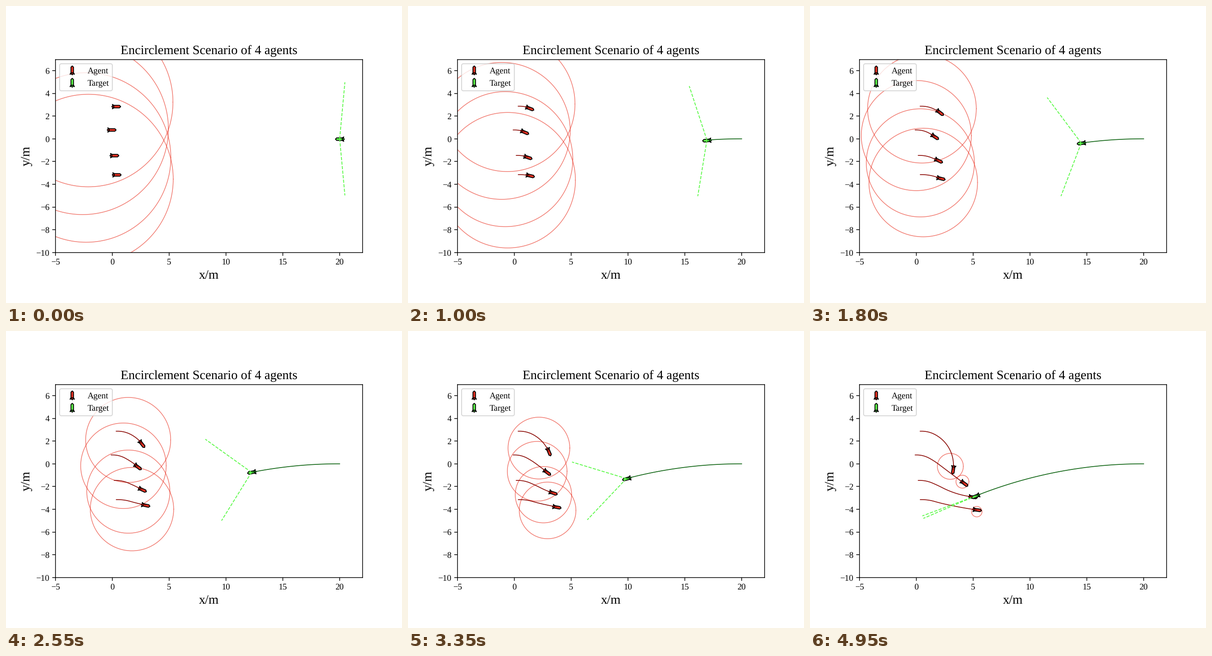
Recreate the animation shown at these times as a matplotlib script. Size 864 by 648 pixels, loop 5000 ms.

```python
import numpy as np
import matplotlib.pyplot as plt
from matplotlib.animation import FuncAnimation
from matplotlib.lines import Line2D
from matplotlib.markers import MarkerStyle
from matplotlib.path import Path
from matplotlib.transforms import Affine2D

FRAMES, STEP = 100, 0.05
RED, GREEN = "#ea3323", "#5ff94c"
DARK_RED, DARK_GREEN = "#8b0a05", "#0d6311"
SPEED = 3.06           # target speed in m/s
RATIO = 1 / 3          # agent speed / target speed
REACH = 5              # length of the sight lines

plt.rcParams["font.family"] = "Liberation Serif"
plt.rcParams["text.hinting"] = "no_hinting"

# Start point of each agent and its heading (degrees) at the turn times.
TURN_TIMES = [0.1, 1.2, 2.2, 5]
AGENTS = [
    ((0.34, 2.87), (0, -26, -45, -99)),
    ((-0.10, 0.78), (0, -28, -37, -37)),
    ((0.17, -1.46), (0, -23, -27, -6)),
    ((0.35, -3.15), (0, -16, -12.5, -8)),
]


def direction(angle):
    return np.stack([np.cos(angle), np.sin(angle)], axis=-1)


def travel(start, heading, speed):
    """Positions after moving one step at a time along the heading."""
    steps = speed * STEP * direction(heading[:-1])
    return np.vstack([start, start + np.cumsum(steps, axis=0)])


times = np.arange(FRAMES) * STEP
target_heading = np.radians(180 + 4.42 * times)
target = travel((20, 0), target_heading, SPEED)
half_angle = np.radians(95.3 - 18.98 * times)

headings = [np.radians(np.interp(times, TURN_TIMES, turns)) for _, turns in AGENTS]
agents = [travel(start, heading, SPEED * RATIO)
          for (start, _), heading in zip(AGENTS, headings)]


def vehicle_path():
    """Pointed hull with a finned tail, nose up."""
    hull = [(0, 1), (0.29, 0.72), (0.29, -0.55), (-0.29, -0.55), (-0.29, 0.72)]
    tail = [(0.29, -0.55), (0.5, -0.86), (0.2, -0.78), (0, -1),
            (-0.2, -0.78), (-0.5, -0.86), (-0.29, -0.55)]
    polygons = [Path(p + p[:1], closed=True) for p in (tail, hull)]
    return Path.make_compound_path(*polygons)


VEHICLE = vehicle_path()


def marker_at(heading):
    return MarkerStyle(VEHICLE, transform=Affine2D().rotate(heading - np.pi / 2))


def vehicle(color, **kw):
    return Line2D([], [], ls="none", marker=VEHICLE, ms=10.4, mew=1,
                  mfc=color, mec="black", **kw)


fig, ax = plt.subplots(figsize=(6.4, 4.8), dpi=135)
ax.set_aspect("equal")
ax.set_xlim(-5, 22)
ax.set_ylim(-10, 6.98)
ax.set_xticks(range(-5, 21, 5))
ax.set_yticks(range(-10, 7, 2))
ax.set_title("Encirclement Scenario of 4 agents", fontsize=15)
ax.set_xlabel("x/m", fontsize=15)
ax.set_ylabel("y/m", fontsize=15)
ax.legend(handles=[vehicle(RED, label="Agent"), vehicle(GREEN, label="Target")],
          loc="upper left")


def add_vehicle(color):
    return ax.add_line(vehicle(color, zorder=3))


def add_line(color, **kw):
    return ax.plot([], [], color=color, **kw)[0]


circles = [add_line(RED, lw=0.8, alpha=0.65, zorder=2) for _ in agents]
ships = [add_vehicle(RED) for _ in agents]
trails = [add_line(DARK_RED, lw=0.9, zorder=4) for _ in agents]
target_ship = add_vehicle(GREEN)
target_trail = add_line(DARK_GREEN, lw=0.9, zorder=4)
sights = [add_line(GREEN, lw=1, ls="--", zorder=5) for _ in range(2)]

ring = direction(np.linspace(0, 2 * np.pi, 181))


def place(ship, trail, path, heading, i):
    ship.set_data(path[i:i + 1].T)
    ship.set_marker(marker_at(heading[i]))
    trail.set_data(path[:i + 1].T)


def dominance_circle(agent, goal):
    """Points the agent and the target reach at the same time."""
    k2 = RATIO**2
    center = (agent - k2 * goal) / (1 - k2)
    radius = RATIO * np.hypot(*(goal - agent)) / (1 - k2)
    return center + radius * ring


def update(i):
    goal = target[i]
    place(target_ship, target_trail, target, target_heading, i)
    for sight, side in zip(sights, (-1, 1)):
        end = goal + REACH * direction(target_heading[i] + side * half_angle[i])
        sight.set_data(*zip(goal, end))
    for ship, trail, circle, path, heading in zip(
            ships, trails, circles, agents, headings):
        place(ship, trail, path, heading, i)
        circle.set_data(dominance_circle(path[i], goal).T)
    return []


anim = FuncAnimation(fig, update, frames=FRAMES, interval=50,
                     repeat=True, repeat_delay=0)
plt.show()
```
